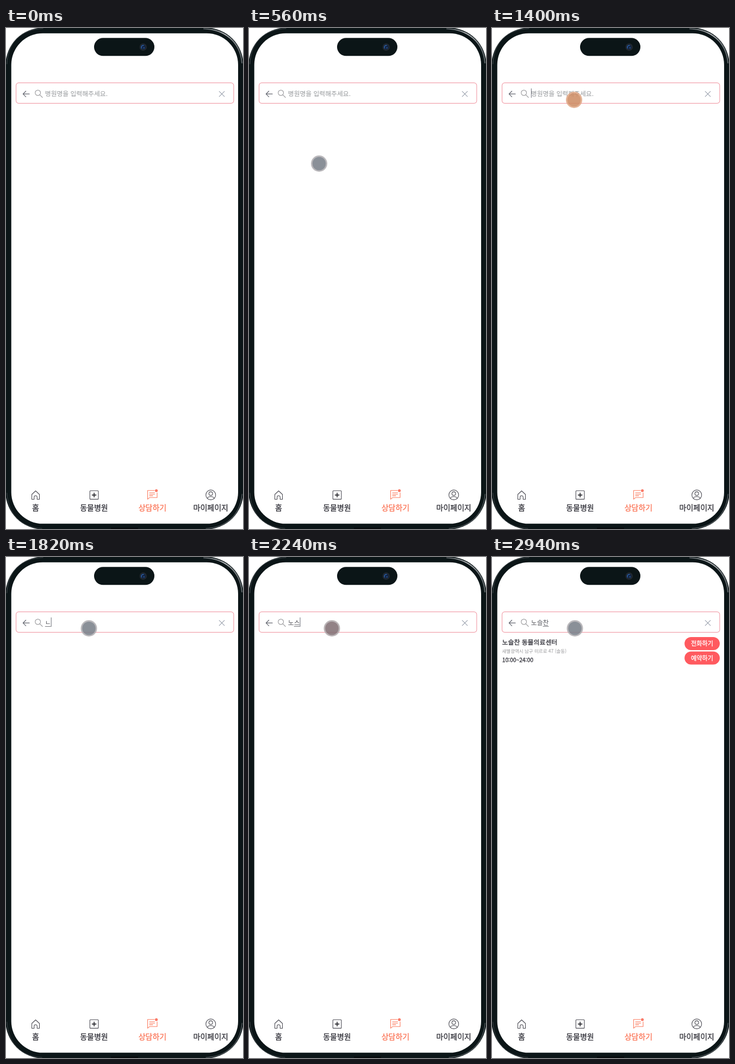
Recreate the animation shown at these times as an HTML page. Size 436 px wide and 920 px high, loop 3080 ms.

```html
<!DOCTYPE html>
<html lang="ko">
<head>
<meta charset="utf-8">
<title>병원 검색</title>
<style>
  html, body { margin: 0; width: 100%; height: 100%; overflow: hidden; background: #fff; }
  svg { display: block; width: 436px; height: 920px; }
  text { font-family: "Noto Sans CJK KR", "Noto Sans KR", "Noto Sans CJK JP", sans-serif; fill: #33333b; }
  .line { fill: none; stroke-linecap: round; stroke-linejoin: round; }
  /* a hairline stroke gives regular glyphs a medium weight */
  .tab text, .name, .hours { stroke: #33333b; stroke-width: .3px; }
  .tab text { font-size: 14px; text-anchor: middle; }
  .tab .line { stroke: #4c4c54; stroke-width: 1.1; }
  .tab.on .line { stroke: #fb7d62; }
  .tab.on text { fill: #fb7456; stroke: #fb7456; }
  .field { font-size: 11.8px; }
  #hint { fill: #96999c; }
  #typed { fill: #55565c; }
  .name { font-size: 11.9px; }
  .addr { font-size: 8.5px; fill: #98989b; }
  .hours { font-size: 10.3px; }
  .pill rect { fill: #ff5a5f; }
  .pill text { font-size: 11.2px; fill: #fff; stroke: #fff; stroke-width: .3px; text-anchor: middle; }
</style>
</head>
<body>
<svg viewBox="0 0 436 920">
  <defs>
    <linearGradient id="shine">
      <stop offset="0" stop-color="#4b5256"/>
      <stop offset=".55" stop-color="#b4b7ba"/>
      <stop offset="1" stop-color="#5a6165"/>
    </linearGradient>
  </defs>

  <!-- phone body, its edge slightly cropped by the stage -->
  <rect x="-.8" y="-.6" width="437.600" height="921.200" rx="69" fill="#0b1517"/>
  <g class="line" stroke-width="1">
    <path d="M1.800 66C3 27 27 2.500 68 .800" stroke="#454c50"/>
    <path d="M364 1.500C402 2.500 431 25 434 64" stroke="url(#shine)" stroke-width="2.200"/>
    <path d="M1.800 854C4 893 27 917 66 919" stroke="#3c4347"/>
    <path d="M434.200 856C431 893 407 917 368 919" stroke="#5d6367" stroke-width="1.200"/>
  </g>
  <rect x="193" y="917.500" width="50" height="2.500" fill="#05090b"/>
  <rect x="9.700" y="9.700" width="417.300" height="900.600" rx="58" fill="#fff"/>
  <rect x="162" y="18.300" width="111" height="33" rx="16.500" fill="#0b1517"/>
  <circle cx="252.300" cy="35" r="6.700" fill="#22292f"/>
  <circle cx="252.300" cy="35" r="4.600" fill="#12233f"/>
  <path class="line" d="M249.500 37A3.300 3.300 0 0 1 253 32" stroke="#2f62a8" stroke-width="1.500"/>
  <circle cx="253.800" cy="36.500" r="1.300" fill="#28518c"/>

  <!-- search field -->
  <rect x="18.500" y="100.700" width="400.400" height="37.700" rx="5" fill="#fff" stroke="#f2a3ad" stroke-width="1.200"/>
  <g class="line">
    <path d="M43 121.200H31.500M36.500 116L31.300 121.200L36.500 126.400" stroke="#62656f" stroke-width="1.200"/>
    <g stroke="#a0a0a3" stroke-width="1.200">
      <circle cx="58.600" cy="119" r="4.900"/>
      <path d="M62.200 122.600L67 127.500"/>
    </g>
    <path d="M392.300 116.400L401.800 125.900M401.800 116.400L392.300 125.900" stroke="#9aa0ad" stroke-width="1.100"/>
  </g>
  <text id="hint" class="field" x="71.800" y="125">병원명을 입력해주세요.</text>
  <text id="typed" class="field" x="71.800" y="125"></text>
  <rect id="under" y="127" height="1" fill="#77787e"/>
  <rect id="caret" y="111" width="1" height="17" fill="#6b6e78"/>

  <g id="list"></g>

  <!-- tab bar -->
  <g class="tab">
    <path class="line" d="M47.500 856.500L54.500 850L61.500 856.500V865.500H57.300V861.500A2.800 2.800 0 0 0 51.700 861.500V865.500H47.500Z"/>
    <text x="54.500" y="885.500">홈</text>
  </g>
  <g class="tab">
    <rect class="line" x="154.300" y="849.800" width="15.600" height="15.600" rx="1"/>
    <path class="line" d="M158.500 857.600H165.700M162.100 854V861.200" style="stroke:#222228;stroke-width:1.600"/>
    <text x="162" y="885.500">동물병원</text>
  </g>
  <g class="tab on">
    <path class="line" d="M273 849.300H260.500V865.300L264 862.300H278V853.500M264 853.500H273.500M264 856.200H273.500M264 858.900H270"/>
    <circle cx="276.600" cy="849.500" r="2.600" fill="#fa7a68"/>
    <text x="269.500" y="885.500">상담하기</text>
  </g>
  <g class="tab">
    <circle class="line" cx="376.700" cy="857.400" r="9"/>
    <circle class="line" cx="376.700" cy="855" r="3.400"/>
    <path class="line" d="M370.500 863.700C371.500 859.500 381.900 859.500 382.900 863.700"/>
    <text x="376.800" y="885.500">마이페이지</text>
  </g>

  <g id="touch" opacity=".86">
    <circle r="15"/>
    <circle r="12.300"/>
  </g>
</svg>

<script>
const LOOP = 3080;
const TEXT_X = 71.8;
const CHAR_W = 11.8 * 0.92;

// [name, address, hours]
const clinics = [
  ["노담 동물병원", "북구 누비로 318 (누비동)", "10:00~19:00"],
  ["노슬찬 동물의료센터", "남구 미르로 47 (솔동)", "10:00~24:00"],
  ["노가온 동물병원", "남구 물빛로 63 (물빛동)", "09:30~19:00"],
  ["노선장 동물병원", "중구 다솜길 82 (다솜동)", "10:00~19:00"],
  ["두노 동물병원", "중구 한결로 406 (여울동)", "09:30~19:00"]
];

// [start ms, x, y]
const moves = [
  [0, -50, -50], [140, 214, 450], [280, 132, 267], [420, 129, 254],
  [560, 129, 249], [700, 133, 225], [840, 138, 181], [980, 148, 145],
  [1120, 151, 133], [1260, 151, 132], [1540, 152.5, 131]
];

// [start ms, inner colour, ring colour]
const grey = ["#787e88", "#b0aeb2"];
const tints = [
  [0, ...grey],
  [1400, "#ce8b63", "#e1a886"],
  [1540, ...grey],
  [2240, "#816e73", "#b0a9ac"],
  [2380, ...grey]
];

// [start ms, query, caret shown]
const typing = [
  [0, "", false], [1400, "", true], [1680, "", false], [1820, "ㄴ", true],
  [1960, "노", true], [2240, "노스", true], [2380, "노슬", false],
  [2520, "노슬ㅊ", true], [2660, "노슬차", true], [2800, "노슬찬", true],
  [2940, "노슬찬", false]
];

const el = id => document.getElementById(id);
const at = (steps, t) => steps.findLast(s => s[0] <= t);
const show = (node, on) => node.setAttribute("visibility", on ? "visible" : "hidden");

const pill = (y, label) => `<g class="pill">
  <rect x="354.2" y="${y}" width="64.8" height="24" rx="12"/>
  <text x="386.5" y="${y + 16}">${label}</text></g>`;

const row = ([name, addr, hours], i) => `<g transform="translate(0 ${i * 67})">
  <text class="name" x="18.5" y="160.8">${name}</text>
  <text class="addr" x="18.5" y="176">새별광역시 ${addr}</text>
  <text class="hours" x="18.7" y="193">${hours}</text>
  ${pill(147, "전화하기")}${pill(173.5, "예약하기")}</g>`;

function drawField([, query, caretOn]) {
  const end = TEXT_X + query.length * CHAR_W;
  show(el("hint"), !query);
  show(el("under"), query);
  show(el("caret"), caretOn);
  el("typed").textContent = query;
  el("under").setAttribute("x", end - CHAR_W);
  el("under").setAttribute("width", CHAR_W);
  el("caret").setAttribute("x", end);
  const found = query ? clinics.filter(c => c[0].includes(query)) : [];
  el("list").innerHTML = found.map(row).join("");
}

const [ring, core] = el("touch").children;
let shown;

function frame(now) {
  const t = now % LOOP;
  const [, x, y] = at(moves, t);
  const [, inner, outer] = at(tints, t);
  el("touch").setAttribute("transform", `translate(${x} ${y})`);
  ring.setAttribute("fill", outer);
  core.setAttribute("fill", inner);

  const step = at(typing, t);
  if (step !== shown) drawField(shown = step);
}

const start = performance.now();
function tick() {
  frame(performance.now() - start);
  requestAnimationFrame(tick);
}
tick();
</script>
</body>
</html>
```
